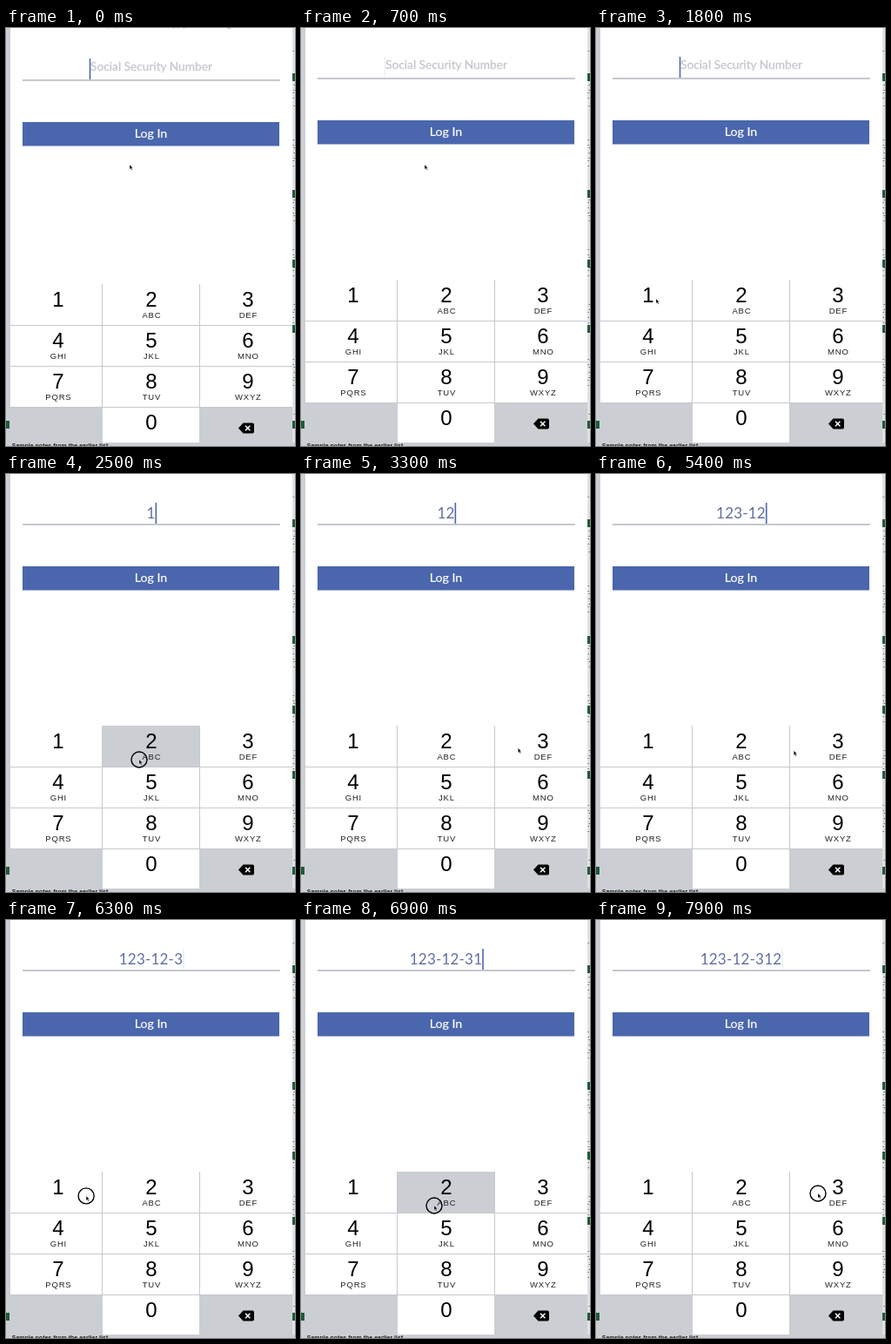
Write an HTML page that moves like this. It is 332x480 px and loops after 8 s.

```html
<!DOCTYPE html>
<html lang="en">
<head>
<meta charset="utf-8">
<title>Number entry</title>
<style>
  html, body { margin: 0; width: 100%; height: 100%; overflow: hidden; background: #cbcfd4; }
  svg { display: block; width: 332px; height: 480px; }
  text { text-anchor: middle; }
  .lato { font-family: Lato, sans-serif; }
  .digit { font: 24px "Liberation Sans", Arial, sans-serif; }
  .letters { font: 9.5px "Liberation Sans", Arial, sans-serif; letter-spacing: .8px; fill: #222; }
  .hint { font-size: 13.7px; fill: #c5c7cd; stroke: #c5c7cd; stroke-width: .3px; }
  .login { font-size: 14.2px; fill: #fff; stroke: #fff; stroke-width: .2px; }
  .value { font-size: 17px; letter-spacing: .2px; fill: #616f9e; }
  .notes { font: bold 7px "Liberation Sans", Arial, sans-serif; fill: #222; }
  /* The caret keeps its own beat, whatever is typed */
  #caret { fill: #4b66b0; }
</style>
</head>
<body>
<svg viewBox="0 0 332 480">
  <defs>
    <clipPath id="screen"><rect x="5" width="324" height="476"/></clipPath>
  </defs>
  <rect width="332" height="480" fill="#cbcfd4"/>
  <g id="backdrop"></g>
  <g clip-path="url(#screen)">
    <rect x="5" width="324" height="476" fill="#fff"/>
    <g id="form">
      <text class="lato" x="167" y="-3" font-size="13" fill="#b9bbc0">to verify your identity, please log</text>
      <path d="M19 58H315" stroke="#c6c8ce" stroke-width="2"/>
      <text id="hint" class="lato hint" x="167" y="47">Social Security Number</text>
      <text id="value" class="lato value" x="166.5" y="50.5"></text>
      <rect id="caret" y="33" width="1.6" height="24"/>
      <rect x="19" y="106" width="295" height="27.5" fill="#4a66ad"/>
      <text class="lato login" x="166.5" y="124">Log In</text>
    </g>
    <g id="pad">
      <rect x="5" y="289" width="324" height="200" fill="#cbced3"/>
      <g id="keys"></g>
      <path d="M110.5 289V430M222.5 289V430M5 336.5H329M5 383.5H329M5 430.5H329" stroke="#c6c9ce"/>
      <path d="M267 454.5l5.5-6H283q2 0 2 2v8q0 2-2 2h-10.5z"/>
      <path d="M275 451.8l5.4 5.4m0-5.4l-5.4 5.4" stroke="#fff" stroke-width="1.5"/>
    </g>
  </g>
  <g id="pointer">
    <circle id="ring" r="9" fill="none" stroke="#000" stroke-width="1.4"/>
    <path d="M0 0V5.2L1.3 4.1L2.2 6.2L3.1 5.8L2.2 3.7H3.8Z" stroke="#fff" stroke-width=".3"/>
  </g>
</svg>
<script>
const LOOP = 8000, STEP = 100, BLINK = 800;
const CYCLE = 2240, FIRST_UP = 2210, HOLD = 300, RING_LEAD = 100;
const HOME = [142, 157], FIRST_AIM = [69, 311];

// Keys 1, 2 and 3 are tapped round and round
const taps = [
  { delay: 0, aim: [86, 317] },
  { delay: 490, aim: [153, 328] },
  { delay: 1540, aim: [255, 314] }
];
const presses = Array.from({ length: 9 }, (_, i) => {
  const { delay, aim } = taps[i % 3];
  const up = FIRST_UP + CYCLE * Math.floor(i / 3) + delay;
  return { key: i % 3 + 1, down: up - HOLD, up, aim: i ? aim : FIRST_AIM };
});

const $ = id => document.getElementById(id);
const clamp = v => Math.max(0, Math.min(1, v));
const smooth = v => v * v * (3 - 2 * v);

function add(parent, tag, attrs, content = "") {
  const node = document.createElementNS("http://www.w3.org/2000/svg", tag);
  for (const name in attrs) node.setAttribute(name, attrs[name]);
  node.textContent = content;
  return parent.appendChild(node);
}

function addKey(label, letters, column, row) {
  const center = [60, 167, 278][column], y = 289 + 47 * row;
  const face = add($("keys"), "rect", { x: 111 * column, y, width: 111, height: 47, fill: "#fff" });
  add($("keys"), "text", { class: "digit", x: center, y: y + 25.8 }, label);
  add($("keys"), "text", { class: "letters", x: center + .4, y: y + 38.8 }, letters);
  return face;
}

function buildKeys() {
  const groups = ["", "ABC", "DEF", "GHI", "JKL", "MNO", "PQRS", "TUV", "WXYZ"];
  const faces = groups.map((letters, i) => addKey(i + 1, letters, i % 3, Math.floor(i / 3)));
  addKey(0, "", 1, 3);
  return faces;
}

function buildBackdrop() {
  const block = (x, y, width, height, fill) => add($("backdrop"), "rect", { x, y, width, height, fill });
  block(329, 0, 3, 476, "#dfe2e3");
  for (let y = 26; y < 445; y += 3) {
    if (Math.sin(y * .8) + Math.sin(y * .1) > .5) block(329.5 + y % 2, y, 1.5, 1, "#6d7472");
  }
  for (const y of [52, 186, 266, 341, 451]) block(329, y, 3, 9, "#1d5b3a");
  block(0, 451, 4, 9, "#1d5b3a");
  add($("backdrop"), "text", { class: "notes", x: 62, y: 482 }, "Sample notes from the earlier list");
}

function pointerAt(t) {
  const next = presses.findIndex(p => t < p.up);
  const last = presses[next - 1];
  const { aim, down } = presses[next];
  const [x, y] = last ? last.aim : HOME;
  const start = last ? last.up : 700;
  const arrival = last ? down - 50 : 1600;
  const k = smooth(clamp((t - start) / (arrival - start)));
  return [x + (aim[0] - x) * k, y + (aim[1] - y) * k];
}

const faces = buildKeys();
buildBackdrop();

function draw(t) {
  const slide = (1 - clamp(t / 500)) ** 2;
  $("form").setAttribute("transform", `translate(0 ${2 * slide})`);
  $("pad").setAttribute("transform", `translate(0 ${5 * slide})`);

  const digits = presses.filter(p => p.up <= t).map(p => p.key).join("");
  const value = [digits.slice(0, 3), digits.slice(3, 5), digits.slice(5)].filter(Boolean).join("-");
  $("value").textContent = value;
  $("hint").setAttribute("visibility", value ? "hidden" : "visible");
  $("caret").setAttribute("x", value ? 166.5 + $("value").getComputedTextLength() / 2 : 95.7);
  $("caret").setAttribute("opacity", clamp((710 - t % BLINK) / 100));

  const held = presses.find(p => p.down <= t && t < p.up);
  faces.forEach((face, i) => face.setAttribute("fill", held && held.key === i + 1 ? "#cbced3" : "#fff"));
  const ringed = presses.some(p => p.down - RING_LEAD <= t && t < p.up);
  $("ring").setAttribute("visibility", ringed ? "visible" : "hidden");
  $("pointer").setAttribute("transform", `translate(${pointerAt(t)})`);
}

function tick() {
  const t = performance.now() % LOOP;
  draw(Math.floor(t / STEP) * STEP);
  requestAnimationFrame(tick);
}
tick();
</script>
</body>
</html>
```
